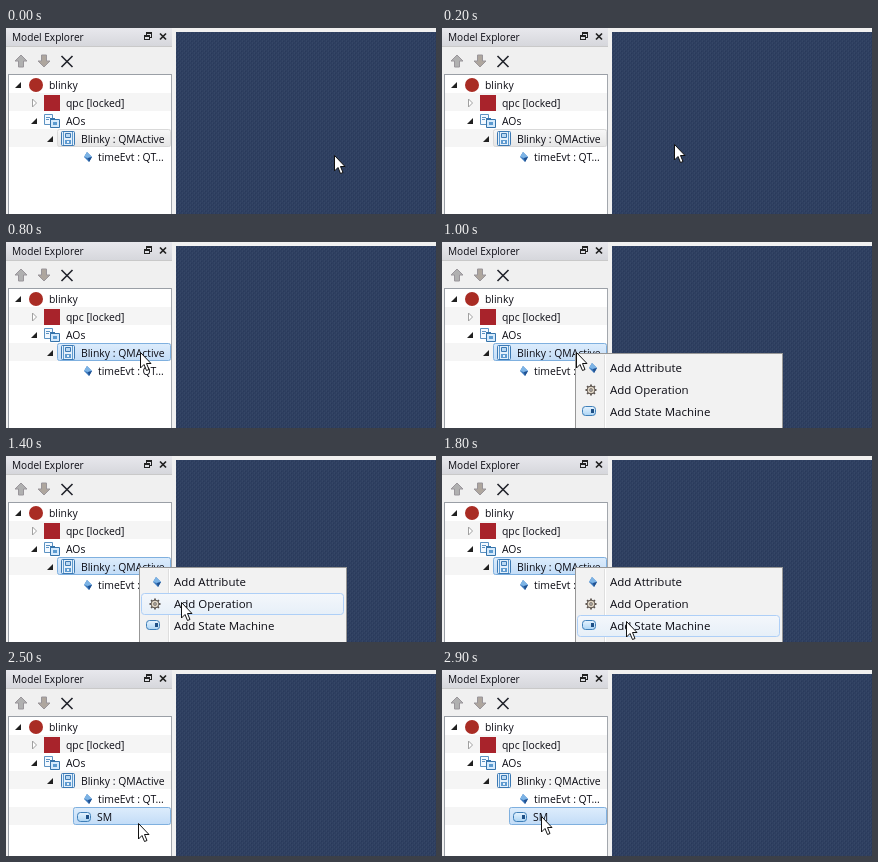
An HTML page with a canvas for the animation above (5.1 s loop, 430x186 px).

```html
<!DOCTYPE html>
<html lang="en">
<head>
<meta charset="utf-8">
<title>Model explorer</title>
<style>
html, body { margin: 0; width: 100%; height: 100%; overflow: hidden; }
canvas { display: block; }
</style>
</head>
<body>
<canvas id="stage" width="430" height="186"></canvas>
<script>
const ctx = document.getElementById('stage').getContext('2d');
const LOOP = 5100;
const TREE_FONT = '10.4px "Open Sans", "Noto Sans", sans-serif';
const TITLE_FONT = '10.1px "Open Sans", "Noto Sans", sans-serif';
const MENU_FONT = '11.5px "Open Sans", "Noto Sans", sans-serif';

// Pointer positions, each held until the next: time, x, y
const pointerPath = [
  [0, 328, 127], [100, 300, 124], [200, 232, 116], [300, 162, 109],
  [400, 134, 107], [500, 133, 109], [600, 134, 110],
  [1300, 152, 127], [1400, 175, 146], [1500, 178, 151], [1600, 181, 157],
  [1700, 183, 162], [1800, 184, 165], [2000, 184, 167],
  [2400, 166, 162], [2500, 132, 153], [2600, 107, 147], [2700, 99, 145],
  [2900, 99, 146]
];

function rect(x, y, w, h, color) {
  ctx.fillStyle = color;
  ctx.fillRect(x, y, w, h);
}

function shape(points, fill, stroke, width = 1) {
  ctx.beginPath();
  points.forEach(([x, y]) => ctx.lineTo(x, y));
  ctx.closePath();
  if (fill) { ctx.fillStyle = fill; ctx.fill(); }
  if (stroke) { ctx.strokeStyle = stroke; ctx.lineWidth = width; ctx.stroke(); }
}

function line(x1, y1, x2, y2, color, width = 1) {
  shape([[x1, y1], [x2, y2]], null, color, width);
}

function rounded(x, y, w, h, r, fill, stroke) {
  ctx.beginPath();
  ctx.roundRect(x + .5, y + .5, w - 1, h - 1, r);
  ctx.fillStyle = fill;
  ctx.fill();
  ctx.strokeStyle = stroke;
  ctx.lineWidth = 1;
  ctx.stroke();
}

function disc(x, y, r, color) {
  ctx.beginPath();
  ctx.arc(x, y, r, 0, Math.PI * 2);
  ctx.fillStyle = color;
  ctx.fill();
}

function label(text, x, y, font = TREE_FONT, color = '#0c0c14') {
  ctx.font = font;
  ctx.fillStyle = color;
  ctx.fillText(text, x, y);
}

function vertical(y, h, top, bottom) {
  const fill = ctx.createLinearGradient(0, y, 0, y + h);
  fill.addColorStop(0, top);
  fill.addColorStop(1, bottom);
  return fill;
}

function makeWeave() {
  const tile = document.createElement('canvas');
  tile.width = 4;
  tile.height = 4;
  const pen = tile.getContext('2d');
  const dab = (color, x, y, w, h) => { pen.fillStyle = color; pen.fillRect(x, y, w, h); };
  dab('#2e3f60', 0, 0, 4, 4);
  dab('#354666', 0, 0, 1, 2);
  dab('#354666', 2, 2, 1, 2);
  dab('#29395a', 1, 1, 1, 1);
  dab('#29395a', 3, 3, 1, 1);
  return ctx.createPattern(tile, 'repeat');
}
const weave = makeWeave();

function diamond(x, y) {
  shape([[x - 1, y - 5], [x + 4, y], [x + 1, y + 5], [x - 4, y]], '#3a78bd');
  shape([[x - 1, y - 5], [x + 4, y], [x, y + 1], [x - 4, y]], '#7db4e6');
  shape([[x + 4, y], [x + 1, y + 5], [x, y + 1]], '#1f4f8e');
}

function stateIcon(x, y) {
  rounded(x, y, 14, 10, 3, vertical(y, 10, '#eaf5ff', '#a9d2f3'), '#3f7fb8');
  rect(x + 9, y + 3, 3, 4, '#1d4f86');
}

function gear(x, y) {
  for (let i = 0; i < 8; i++) {
    const a = i * Math.PI / 4;
    line(x, y, x + 5.5 * Math.cos(a), y + 5.5 * Math.sin(a), '#5e5650', 1.8);
  }
  disc(x, y, 4.2, '#5e5650');
  disc(x, y, 3.3, '#e0d6c6');
  disc(x, y, 1.7, '#5e5650');
  disc(x, y, .8, '#f0f0f0');
}

function expanded(x, y) {
  shape([[x + 3, y - 3], [x + 3, y + 3], [x - 3, y + 3]], '#202020');
}

function classIcon(x, y) {
  rounded(x, y, 14, 15, 1, '#e4f0fb', '#3c79b3');
  rect(x + 2, y + 1, 1, 13, '#5f9bd0');
  rect(x + 11, y + 1, 1, 13, '#5f9bd0');
  rounded(x + 4, y + 2, 6, 5, 0, '#b9d8f3', '#3c79b3');
  rect(x + 4, y + 9, 6, 4, '#5f9bd0');
  rect(x + 6, y + 10, 2, 2, '#e4f0fb');
}

function packageIcon(x, y) {
  rounded(x, y, 9, 11, 0, '#f3f9ff', '#5c92c2');
  rect(x + 2, y + 3, 4, 1, '#5c92c2');
  rect(x + 2, y + 5, 3, 1, '#5c92c2');
  rect(x + 6, y + 4, 5, 2, '#3674ab');
  rounded(x + 6, y + 5, 10, 9, 0, '#d5eafc', '#3674ab');
  rect(x + 9, y + 8, 4, 3, '#5c9bd0');
}

function arrow(x, y, up) {
  const s = up ? 1 : -1;
  shape([[0, -6], [6, 0], [2.5, 0], [2.5, 6], [-2.5, 6], [-2.5, 0], [-6, 0]]
    .map(([dx, dy]) => [x + dx, y + dy * s]), up ? '#b0b0b0' : '#aea69e', '#99959a');
}

function cross(x, y, r, color, width) {
  line(x - r, y - r, x + r, y + r, color, width);
  line(x + r, y - r, x - r, y + r, color, width);
}

function drawWindow() {
  rect(0, 0, 430, 186, '#f0f0f0');
  rect(0, 0, 166, 18, vertical(0, 18, '#e8e8ed', '#d6d7dc'));
  rect(0, 18, 166, 1, '#c9c9c9');
  label('Model Explorer', 6, 13, TITLE_FONT);
  ctx.strokeStyle = '#222';
  ctx.lineWidth = 1;
  ctx.strokeRect(140.5, 4.5, 5, 5);
  rect(138, 7, 6, 6, '#dedfe4');
  ctx.strokeRect(138.5, 7.5, 5, 4);
  rect(138, 7, 6, 2, '#222');
  rect(140, 4, 6, 2, '#222');
  cross(157, 8.5, 3, '#222', 1.7);

  arrow(15, 33, true);
  arrow(38, 33, false);
  cross(61, 33.5, 5.5, '#22242c', 1.6);

  rect(2, 46, 164, 140, '#fff');
  rect(2, 46, 164, 1, '#9a9fa6');
  rect(2, 46, 1, 140, '#9a9fa6');
  rect(165, 46, 1, 140, '#a3a7ad');
  rect(170, 4, 260, 182, weave);
}

const selection = {
  idle: ['#f8f8f8', '#e5e5e5', '#d9d9d9'],
  soft: ['#f4f9fe', '#e7f1fb', '#b9d7f2'],
  active: ['#deedfc', '#c2dcf7', '#7fb0df']
};

// Selections reach the right edge of the tree.
function highlight(x, y, style) {
  const [top, bottom, edge] = selection[style];
  rounded(x, y, 165 - x, 18, 2, vertical(y, 18, top, bottom), edge);
}

function drawTree(t) {
  const added = t >= 2000;
  const blinkyStyle = t < 300 ? 'idle' : t < 2000 ? 'active' : t < 2400 ? 'soft' : null;

  [65, 101].forEach(y => rect(3, y, 162, 18, '#f5f5f5'));
  if (added) rect(3, 137, 162, 18, '#f5f5f5');
  if (blinkyStyle) highlight(51, 101, blinkyStyle);

  expanded(12, 57);
  disc(30, 57, 7, '#a92c24');
  label('blinky', 43, 61);

  shape([[26.5, 71], [30.5, 75], [26.5, 79]], '#fff', '#a0a0a0');
  rect(38, 67, 16, 16, '#a8232b');
  label('qpc [locked]', 60, 79);

  expanded(28, 93);
  packageIcon(38, 86);
  label('AOs', 60, 97);

  expanded(44, 111);
  classIcon(55, 103);
  label('Blinky : QMActive', 75, 115);

  diamond(82, 129);
  label('timeEvt : QT...', 92, 133);

  if (added) {
    highlight(67, 137, 'active');
    stateIcon(71, 142);
    label('SM', 91, 151);
  }
}

function drawMenu(pointer) {
  rect(133, 111, 208, 75, '#979797');
  rect(134, 112, 206, 74, '#f2f2f2');
  rect(162, 113, 1, 73, '#dedede');
  rect(163, 113, 1, 73, '#fff');

  if (pointer[0] >= 1300) {
    const y = 115 + 22 * Math.floor((pointer[2] - 115) / 22);
    rounded(135, y, 203, 22, 3, vertical(y, 22, '#f4f7fb', '#e6eff8'), '#aecff7');
  }
  diamond(151, 126);
  gear(149, 148);
  stateIcon(140, 164);
  ['Add Attribute', 'Add Operation', 'Add State Machine']
    .forEach((text, i) => label(text, 168, 130 + i * 22, MENU_FONT));
}

function drawPointer([, x, y]) {
  const outline = [[0, 0], [0, 15.5], [3.5, 12], [6, 18], [8.5, 17], [6, 11], [10.5, 11]];
  shape(outline.map(([dx, dy]) => [x + dx + .5, y + dy + .5]), '#fff', '#111');
}

function draw(now) {
  const t = now % LOOP;
  const pointer = pointerPath.filter(([time]) => time <= t).pop();
  drawWindow();
  drawTree(t);
  if (t >= 1000 && t < 2000) drawMenu(pointer);
  drawPointer(pointer);
}

let start;
function tick(now) {
  start ??= now;
  draw(Math.max(0, now - start));
  requestAnimationFrame(tick);
}
draw(0);
requestAnimationFrame(tick);
</script>
</body>
</html>
```
